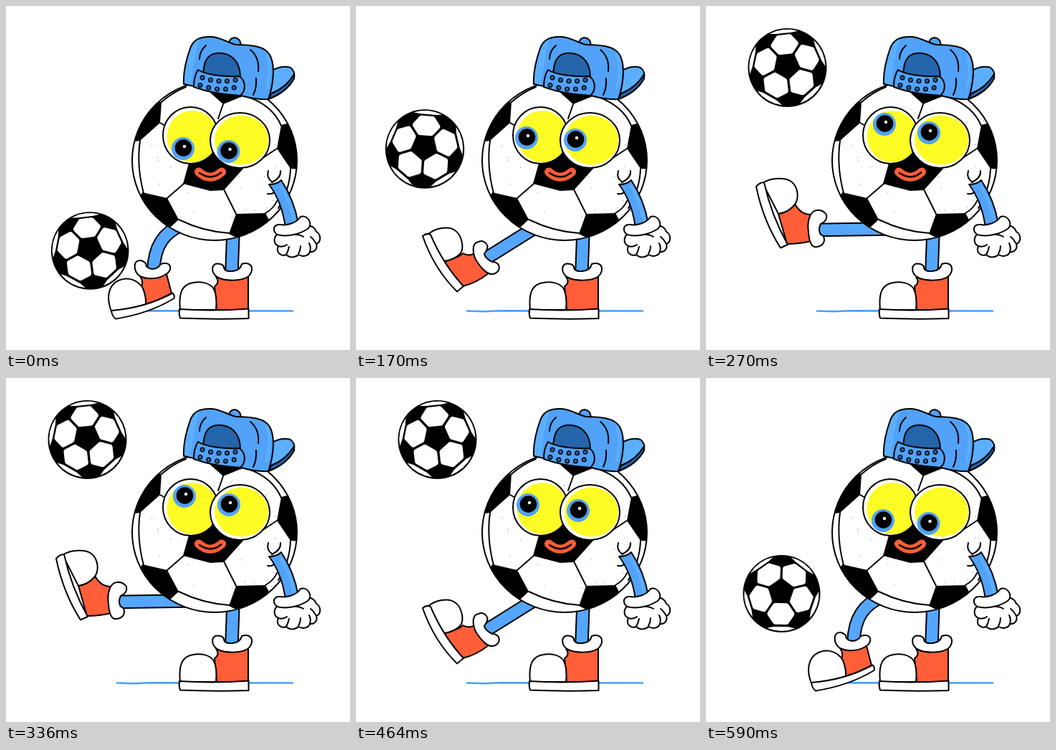
Write an HTML page that moves like this. It is 480 px wide and 480 px high and loops after 690 ms.

```html
<!DOCTYPE html>
<html lang="en">
<head>
<meta charset="utf-8">
<title>Ball juggler</title>
<style>
html, body { margin: 0; width: 100%; height: 100%; overflow: hidden; background: #fff; }
svg { display: block; width: 100%; height: 100%; }

.ink { fill: none; stroke: #000; stroke-width: 2; stroke-linecap: round; stroke-linejoin: round; }
.white { fill: #fff; }
.red { fill: #ff5e38; }
.blue { fill: #51a2f8; }
.light { fill: #5cafff; }
.navy { fill: #2565ab; }
.yellow { fill: #fffb24; }
.tube { fill: none; stroke: #000; stroke-width: 19.5; }
.tube + .tube { stroke: #55a7fd; stroke-width: 15.5; }
.shine { fill: none; stroke: #5cafff; stroke-width: 4; stroke-linecap: round; }

.step { animation: 690ms step-end infinite; }
.pose { opacity: 0; }

/* Leg poses */
#legDown { animation-name: legDown; }
#legMid { animation-name: legMid; }
#legUp { animation-name: legUp; }
@keyframes legDown { 0%, 85.5% { opacity: 1; } 24.63% { opacity: 0; } 100% { opacity: 1; } }
@keyframes legMid { 0%, 39.13%, 85.5%, 100% { opacity: 0; } 24.63%, 55.07% { opacity: 1; } }
@keyframes legUp { 0%, 55.07%, 100% { opacity: 0; } 39.13% { opacity: 1; } }

/* Small ball along its flight */
#ballKick { animation-name: ballKick; }
#ballLow { animation-name: ballLow; }
#ballRise { animation-name: ballRise; }
#ballTop { animation-name: ballTop; }
#ballFall { animation-name: ballFall; }
@keyframes ballKick { 0% { opacity: 1; } 10.14%, 100% { opacity: 0; } }
@keyframes ballLow { 0%, 24.63% { opacity: 0; } 10.14%, 85.5%, 100% { opacity: 1; } }
@keyframes ballRise { 0%, 39.13%, 100% { opacity: 0; } 24.63% { opacity: 1; } }
@keyframes ballTop { 0%, 75.36%, 100% { opacity: 0; } 39.13% { opacity: 1; } }
@keyframes ballFall { 0%, 85.5%, 100% { opacity: 0; } 75.36% { opacity: 1; } }

/* Gaze follows the ball */
#gazeL { animation-name: gazeL; }
#gazeR { animation-name: gazeR; }
@keyframes gazeL {
  0%, 85.5%, 100% { transform: translate(247px, 199px); }
  24.63% { transform: translate(238px, 184px); }
  39.13% { transform: translate(249px, 165px); }
  55.07% { transform: translate(240px, 177px); }
}
@keyframes gazeR {
  0%, 85.5%, 100% { transform: translate(310.5px, 203px); }
  24.63% { transform: translate(306px, 187px); }
  39.13% { transform: translate(311px, 177px); }
  55.07% { transform: translate(310px, 185px); }
}
</style>
</head>
<body>
<svg viewBox="0 0 480 480">
  <defs>
    <clipPath id="bodyClip"><ellipse cx="291" cy="215.5" rx="114.5" ry="111"/></clipPath>
    <g id="pupil">
      <circle r="16" class="blue"/>
      <circle cx=".5" cy="-1" r="11.8"/>
      <circle cx="2" cy="-3" r="2.2" class="white"/>
    </g>
  </defs>

  <path d="M155 425.5L180 426.2 200 425.300 400 425.500" fill="none" stroke="#4b9ff8" stroke-width="2.6" stroke-linecap="round"/>

  <g id="balls"></g>

  <!-- Standing leg -->
  <g>
    <path class="tube" d="M317 315L315 370"/><path class="tube" d="M317 315L315 370"/>
    <path class="ink red" d="M293 378Q299 386 291 391L294 424H338V376Z"/>
    <path class="ink white" d="M243 424C241 404 244 391 257 387C270 383 285 386 290 395C294 403 294 414 293 424Z"/>
    <path class="ink white" d="M242 423Q290 426 338.500 422.500V436Q290 437.500 243 435.500Q241 430 242 423Z"/>
    <path class="ink white" d="M299 360C285 356 285 374 296 379C306 384 328 384 337 378C347 371 345 355 329 360Q327 369 316 370Q304 371 304 364Q303 361 299 360Z"/>
  </g>

  <!-- Kicking leg -->
  <g id="legDown" class="pose step">
    <path class="tube" d="M246 305C222 315 207 333 206 368"/><path class="tube" d="M246 305C222 315 207 333 206 368"/>
    <path class="ink red" d="M187 377Q193 386 188 393L196 418L231 401L223 370Z"/>
    <path class="ink white" d="M147 426C140 408 142 390 157 383C171 377 185 383 191 394Q196 406 195 418Q170 423 147 426Z"/>
    <path class="ink white" d="M147 425Q195 421 232.500 400.500Q236 404 234.500 408Q200 429 153 436.500Q148 433 147 425Z"/>
    <path class="ink white" d="M188 355C176 354 178 371 187 377C197 382 212 381 222 375C234 369 231 355 216 360Q212 367 204 367Q195 366 195 359Q192 356 188 355Z"/>
  </g>
  <g id="legMid" class="pose step">
    <path class="tube" d="M252 308L180 353"/><path class="tube" d="M252 308L180 353"/>
    <path class="ink red" d="M122 357L136 352Q146 349 149 345Q158 350 165 345L185 373Q167 387 149 391Z"/>
    <path class="ink white" d="M100 319C110 310 129 306 138 313C148 320 151 337 146 345Q138 354 123 356Z"/>
    <path class="ink white" d="M93 321Q99 316 104 319Q122 361 150 391L141 398.500Q109 367 93 321Z"/>
    <path class="ink white" d="M171 329C160 331 163 348 169 357C176 367 183 375 191 374C203 372 203 357 190 357Q180 352 179 346Q186 337 182 332Q177 326 171 329Z"/>
  </g>
  <g id="legUp" class="pose step">
    <path class="tube" d="M252 311L154 312.500"/><path class="tube" d="M252 311L154 312.500"/>
    <path class="ink red" d="M101 290L117 281Q123 279 124 276Q132 291 146 291L147 328Q131 332 113 332Z"/>
    <path class="ink white" d="M79 247C91 239 111 239 119 245C129 253 130 268 124 277Q115 288 101 290Z"/>
    <path class="ink white" d="M70 252Q75 246 81 246Q91 292 114 333L104 337.500Q80 300 70 252Z"/>
    <path class="ink white" d="M155 285C144 286 141 302 143 316C144 330 148 338 155 336C168 334 167 320 160 319Q156 312 160 304Q170 300 168 291Q163 284 155 285Z"/>
  </g>

  <!-- Body -->
  <ellipse class="white" cx="291" cy="215.500" rx="115" ry="111.500"/>
  <g clip-path="url(#bodyClip)">
    <g id="specks" fill="#999"></g>
    <path d="M200 132L217 134L215 163L187 188L172 190ZM284 120L303 137L330 126L325 112ZM384 166L378 199L397 227L412 228L408 160ZM256 216L247 248L285 258L304 257L331 227L310 200H280ZM190 260L225 268L241 298L228 310L180 280ZM321 290L362 289L368 300L335 330L311 318Z"/>
    <path class="ink" d="M217 134Q233 120 251 113M187 188Q182 223 192 261M215 163L224 168M303 137L296 157M338 127Q372 139 384 167M345 222Q362 209 378 199M248 248L225 268M304 256L321 290M241 298Q276 315 312 317M362 289Q374 282 378 272M397 227Q396 256 380 282"/>
  </g>
  <ellipse class="ink" cx="291" cy="215.500" rx="115" ry="111.500"/>

  <!-- Eyes -->
  <ellipse class="ink white" cx="257.500" cy="180.500" rx="38.500" ry="39.500"/>
  <ellipse class="yellow" cx="260" cy="182" rx="35.500" ry="36"/>
  <g id="gazeL" class="step"><use href="#pupil"/></g>
  <ellipse class="ink white" cx="326.500" cy="187.500" rx="41.500" ry="38.500"/>
  <ellipse class="yellow" cx="328.500" cy="187" rx="37.500" ry="34.500"/>
  <g id="gazeR" class="step"><use href="#pupil"/></g>

  <!-- Mouth -->
  <g fill="none" stroke-linecap="round">
    <path d="M269 231.500Q285 246 301 231.500" stroke="#ff5e38" stroke-width="12"/>
    <path d="M270 233Q286 244 300 232.500" stroke="#000" stroke-width="2.600"/>
  </g>

  <!-- Arm and glove -->
  <path class="white" d="M363 236L383 230L392 246L370 262Z"/>
  <path class="ink blue" d="M367 249Q385 273 390 309L408 304Q402 270 384 243Q378 249 367 249Z"/>
  <path class="shine" d="M384 252Q397 274 402 300"/>
  <path class="ink" d="M366 230Q363 240 371 245M383 230Q384 240 371 246M365 262Q371 263 374 260"/>
  <path class="ink white" d="M382 317C373 320 372 331 380 335C376 344 384 350 391 347C396 352 404 351 408 347C415 351 423 348 424 343C431 344 435 338 433 332C440 329 440 319 433 315C430 307 424 306 419 307Z"/>
  <path class="ink" d="M380 335Q387 337 392 333M391 347Q394 341 395 336M408 346Q411 341 411 335M424 343Q426 337 423 331M433 332Q429 325 425 322M397 319Q409 318 415 322"/>
  <path class="ink white" d="M382 305C371 304 371 319 383 320C396 322 412 317 421 311C429 304 421 291 411 294C406 302 393 307 382 305Z"/>

  <!-- Cap -->
  <path class="ink blue" d="M311 53Q311 45 319 44Q327 45 328 55Z"/>
  <path class="ink light" d="M371 90Q386 82 397 86Q404 91 402 101Q391 121 366 130Z"/>
  <path class="ink navy" d="M402 95Q391 114 370 122L367 129.500Q392 120 402 101Z"/>
  <path class="ink blue" d="M248 109C247 91 252 73 257 59C261 47 271 42 287 43C300 44 309 51 321 54C342 54 361 56 368 68C377 84 372 113 366 130Q348 131 328 125L262 112Z"/>
  <path class="light" d="M249 107C249 91 254 72 259 59Q263 49 270 46Q263 70 258 110Z"/>
  <path class="ink navy" d="M275 96C276 80 279 68 293 66C313 64 327 76 327 100Z"/>
  <path class="ink blue" d="M268 89C278 96 305 99 325 98C334 103 336 117 327 125C307 124 281 120 262 113C262 102 264 95 268 89Z"/>
  <g id="holes" class="ink navy" style="stroke-width:1.400"></g>
  <path class="ink" d="M279 55Q270 63 270 74M341 61Q354 72 352 91M349 101Q350 114 345 124"/>
  <path class="shine" d="M364 69Q371 85 364 115"/>
</svg>
<script>
const $ = id => document.getElementById(id);
const add = (parent, tag, attrs) => {
  const el = document.createElementNS('http://www.w3.org/2000/svg', tag);
  for (const k in attrs) el.setAttribute(k, attrs[k]);
  return parent.appendChild(el);
};

// Front view of a sphere of pentagons and hexagons, tipped slightly upward.
const HEX = [[.343, -36], [.343, 36], [.687, 36], [.857, 13.6], [.857, -13.6], [.687, -36]];
const RIM = [[.89, -13], [.89, 13], [.965, 22], [.967, 11], [.967, 0], [.967, -11], [.965, -22]];

function ball(id, x, y, R, turn) {
  const g = add($('balls'), 'g', { id, class: 'pose step' });
  add(g, 'circle', { cx: x, cy: y, r: R });
  const place = (list, base) => list.map(([r, deg]) => {
    const a = (base + deg) * Math.PI / 180, tip = 1 - r * r;
    return [x + R * r * Math.cos(a) - tip, y + R * r * Math.sin(a) - 3.5 * tip];
  });
  const shrink = (pts, k) => {
    const mid = [0, 1].map(i => pts.reduce((s, p) => s + p[i], 0) / pts.length);
    return pts.map(p => p.map((v, i) => mid[i] + (v - mid[i]) * k));
  };
  for (let base = turn; base < turn + 360; base += 72) {
    add(g, 'polygon', { points: place(RIM, base).join(' '), fill: '#fff' });
    add(g, 'polygon', {
      points: shrink(place(HEX, base), .7).join(' '),
      fill: '#fff', stroke: '#fff', 'stroke-width': 7.4, 'stroke-linejoin': 'round'
    });
  }
}

ball('ballKick', 117.2, 341.5, 54.3, -97);
ball('ballLow', 105.5, 301, 54, -53);
ball('ballRise', 96, 199.5, 55.2, -85);
ball('ballTop', 113.5, 86, 55, -96);
ball('ballFall', 106, 143, 54.5, -66);

// Strap holes in two rows
for (let i = 0; i < 5; i++) {
  const sag = i * (5 - i);
  add($('holes'), 'circle', { cx: 274 + 11.5 * i, cy: 100 + .8 * sag, r: 2.8 });
  add($('holes'), 'circle', { cx: 271 + 11.8 * i, cy: 110.5 + .9 * sag, r: 2.8 });
}

// Faint grain on the leather
let seed = 7;
const rand = () => (seed = seed * 16807 % 2147483647) / 2147483647;
for (let i = 0; i < 75; i++) {
  add($('specks'), 'circle', { cx: 188 + rand() * 200, cy: 118 + rand() * 190, r: .7 });
}
</script>
</body>
</html>
```
